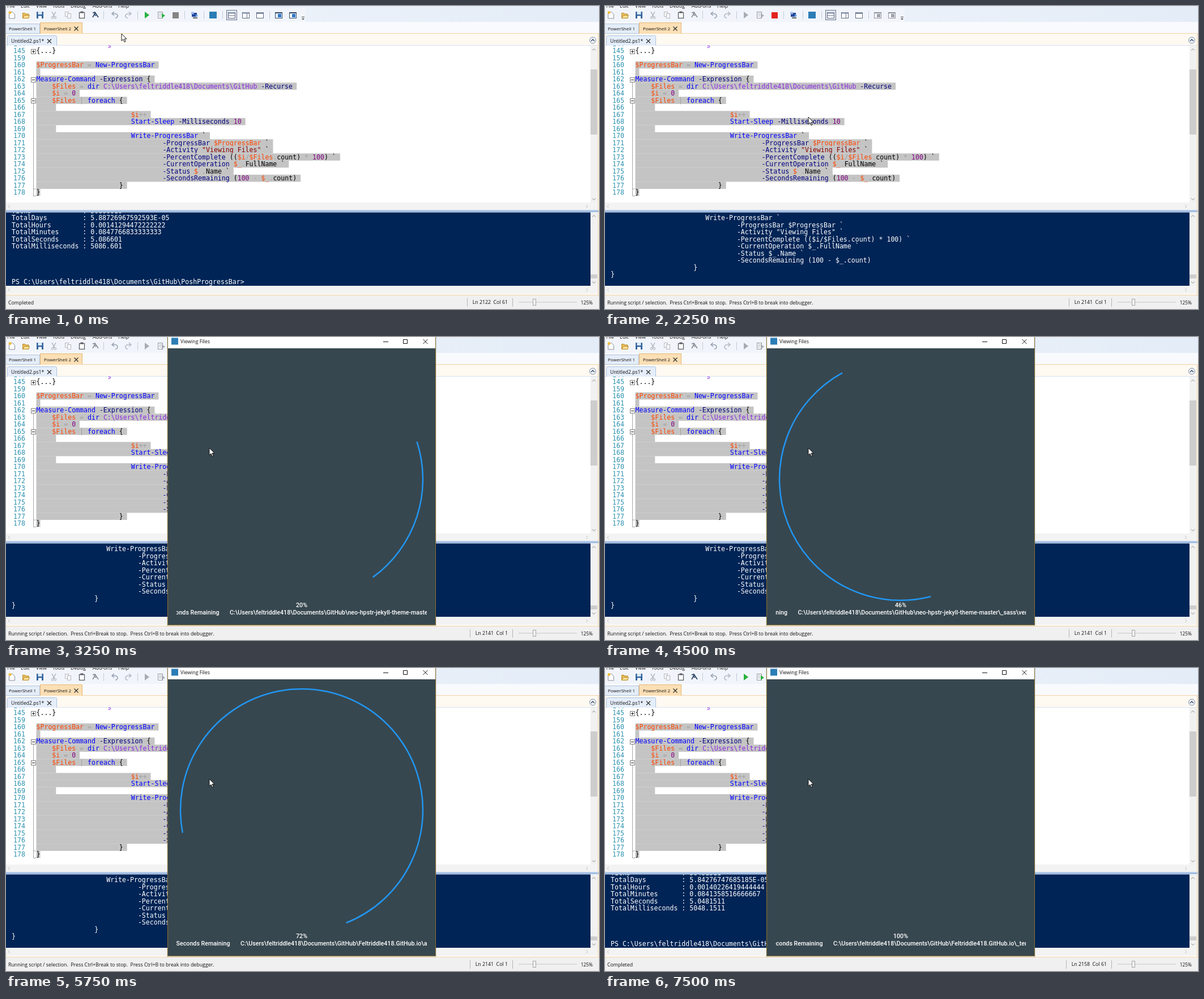
These frames come from a looping animation (1047x535 px, 8000 ms). An HTML page:

```html
<!DOCTYPE html>
<html lang="en">
<head>
<meta charset="utf-8">
<title>Script progress</title>
<style>
html, body { margin: 0; width: 100%; height: 100%; overflow: hidden; background: #fff; }
svg { display: block; width: 100%; height: 100%; }
text { white-space: pre; }
.mono { font: 11.57px "DejaVu Sans Mono", monospace; }
.ui { font: 8.8px "Open Sans", "Noto Sans", sans-serif; fill: #111; }
.tab { font-size: 8px; }
.file { font-size: 8.6px; }
.zoom { font-size: 8.4px; }
.bar { font: 500 10.7px Roboto, sans-serif; fill: #fff; }
.num { fill: #2b91af; }
.con { fill: #fff; }
.v { fill: #ff4500; } .o { fill: #a0a0a0; } .c { fill: #0000ff; } .p { fill: #000080; }
.a { fill: #8a2be2; } .s { fill: #8b0000; } .n { fill: #800080; } .b { fill: #000; }
</style>
</head>
<body>
<svg id="stage" viewBox="0 0 1047 535"></svg>
<script>
const STEP = 250, LOOP = 8000, RUN_AT = 6, WINDOW_AT = 10, DONE_AT = 29;
const CELL = 6.966, ROW = 12.5, USER = 'feltriddle418';
const HOME = `C:\\Users\\${USER}\\Documents\\GitHub`;

const esc = s => s.replace(/&/g, '&amp;').replace(/</g, '&lt;');
const rect = (x, y, w, h, fill, more = '') =>
  `<rect x="${x}" y="${y}" width="${w}" height="${h}" fill="${fill}" ${more}/>`;
const path = (d, stroke, width = 1, fill = 'none') =>
  `<path d="${d}" stroke="${stroke}" stroke-width="${width}" fill="${fill}"/>`;
const text = (x, y, s, cls, more = '') =>
  `<text x="${x}" y="${y}" class="${cls}" ${more}>${esc(s)}</text>`;
const group = (id, body, more = '') => `<g id="${id}" ${more}>${body}</g>`;
const END = 'text-anchor="end"', MID = 'text-anchor="middle"';

// Each line: indent, then tokens whose first letter is the colour class.
const code = [
  [0, 'v$ProgressBar~o = ~cNew-ProgressBar'],
  [0, ''],
  [0, 'cMeasure-Command~p -Expression~b {'],
  [4, `v$Files~o = ~cdir ~a${HOME}~p -Recurse`],
  [4, 'v$i~o = ~n0'],
  [4, 'v$Files~o | ~cforeach~b {'],
  [4, ''],
  [24, 'v$i~o++'],
  [24, 'cStart-Sleep~p -Milliseconds~n 10'],
  [4, ''],
  [24, 'cWrite-ProgressBar~b `'],
  [32, 'p-ProgressBar ~v$ProgressBar~b `'],
  [32, 'p-Activity ~s"Viewing Files"~b `'],
  [32, 'p-PercentComplete ~b((~v$i~o/~v$Files~o.~bcount)~o * ~n100~b) `'],
  [32, 'p-CurrentOperation ~v$_~o.~bFullName `'],
  [32, 'p-Status ~v$_~o.~bName `'],
  [32, 'p-SecondsRemaining ~b(~n100~o - ~v$_~o.~bcount)'],
  [21, 'b}'],
  [0, 'b}'],
].map(([indent, src]) => {
  const tokens = src ? src.split('~').map(t => [t[0], t.slice(1)]) : [];
  return { indent, tokens, plain: tokens.map(t => t[1]).join('') };
});

function editor() {
  const left = 53.5;
  let out = rect(0, 70, 1032, 277, '#fff');
  out += text(13, 70.5, '144', 'mono num') + text(left + 18 * CELL, 70.5, 'g', 'mono a');
  out += text(13, 83, '145', 'mono num') + text(left, 83, '{...}', 'mono b');
  out += text(13, 95.5, '159', 'mono num');
  code.forEach((line, i) => {
    const y = 108 + i * ROW, last = i === code.length - 1;
    const cells = line.indent + line.plain.length + (last ? 0 : 1);
    out += rect(left, y - 10.2, cells * CELL, ROW + .1, '#c4c4c4');
    out += text(13, y, String(160 + i), 'mono num');
    const spans = line.tokens.map(([cls, s]) => `<tspan class="${cls}">${esc(s)}</tspan>`).join('');
    out += `<text class="mono" x="${left + line.indent * CELL}" y="${y}">${spans}</text>`;
  });
  out += path('M48.5 134v29M48.5 171v164.500h4.500M48.5 323h4', '#a5a5a5');
  for (const [y, plus] of [[80, 1], [130, 0], [167, 0]])
    out += rect(44.5, y - 3.5, 8, 8, '#fff', 'stroke="#808080"') +
      path(`M46 ${y + .5}h5${plus ? 'M48.5 ' + (y - 2) + 'v5' : ''}`, '#222');
  return `<g clip-path="url(#editClip)">${out}</g>`;
}

const consoleLine = (row, s, indent = 0) =>
  text(10 + indent * CELL, 378 + row * ROW, s, 'mono con');

function results(ticks, days, hours, minutes, seconds, millis) {
  const rows = { Ticks: ticks, TotalDays: days, TotalHours: hours, TotalMinutes: minutes,
    TotalSeconds: seconds, TotalMilliseconds: millis };
  return Object.entries(rows).map(([k, v], i) => consoleLine(i - 1, k.padEnd(18) + ': ' + v)).join('') +
    consoleLine(9, `PS ${HOME}\\PoshProgressBar>`);
}

function status(message, place, edge) {
  return text(4, 527, message, 'ui') + text(886, 526, place, 'ui', END) +
    path(`M${edge} 516v15`, '#b5b5b5');
}

const frame = (x, split) => rect(x - 6.5, 11.5, 12, 10, '#fff', 'stroke="#5f6b80"') +
  rect(x - 6, 11, 11, 2.5, '#8593ab') + path(split, '#5f6b80');

function toolbar() {
  const grey = '#a9adb4';
  let out = path('M5.500 10.500h6l4 4v7.500h-10z', '#8a8f98', 1, '#fff') +
    '<circle cx="7" cy="11.500" r="2.500" fill="#f0bd3c"/>';
  out += path('M29.500 21.500v-9h4l1.500 1.500h5v7.500z', '#b98a2c', 1, '#e9bd5b') +
    path('M29.500 21.500l3-5h9l-2 5z', '#b98a2c', 1, '#fbdf96');
  out += rect(54, 10, 12, 12, '#35669f') + rect(56.5, 10, 7, 5, '#dce8f6') + rect(57, 17.5, 6, 4.5, '#fff');
  out += path('M81 10l5 9M88 10l-5 9', grey, 1.3) +
    '<g fill="none" stroke="#a9adb4"><circle cx="82" cy="20.500" r="1.800"/><circle cx="87" cy="20.500" r="1.800"/></g>';
  out += rect(104.5, 10.5, 6, 8, '#f5f6f8', 'stroke="#b6b9bf"') + rect(108.5, 13.5, 6, 8, '#f5f6f8', 'stroke="#b6b9bf"');
  out += rect(129.5, 11.5, 9, 10, '#fff', 'stroke="#5a5d63" stroke-width="1.300"') + rect(131.5, 9.5, 5, 3, '#5a5d63');
  out += path('M187 13.500h6q4 1 4 4t-4 4M191 10l-4 3.500 4 3.500', '#9aa3b3', 1.6);
  out += path('M221 13.500h-6q-4 1-4 4t4 4M217 10l4 3.500-4 3.500', '#b4bac5', 1.6);
  out += rect(328, 12, 9, 7, '#24479b') + rect(327, 10.5, 5, 4, '#9bb8e8') + path('M330 21h8', '#333', 1.5) +
    '<circle cx="336.500" cy="17" r="2" fill="#68a4e6"/>';
  out += rect(359, 10, 13, 12, '#2b7db6');
  out += rect(389.5, 7.5, 18, 17, '#e4e9f2', 'stroke="#6a7386"');
  out += frame(399, 'M393 17h11') + frame(424, 'M425.500 13v8') + frame(449, 'M443 13h11');
  out += [172, 232, 315, 349, 382, 465].map(x => path(`M${x}.5 9v14`, '#c3cad6')).join('');
  return out + path('M522 19.500h5', '#444') + path('M522 22h5l-2.500 2.500z', 'none', 0, '#444');
}

function runButtons(busy) {
  const pick = (on, off) => busy ? off : on;
  const go = pick('#25b03c', '#a7abb2'), ink = pick('#2d4568', '#8c9098'), accent = pick('#2c75c9', '#9ba1ab');
  let out = path('M153 12l4-1 6 9M157 11l-1 4-3 5M156 15l3 2', ink, 1.7);
  out += path('M245 10l8 6-8 6z', 'none', 0, go);
  out += rect(268.5, 10.5, 8, 11, '#fff', 'stroke="#9298a3"') + path('M270 13h5M270 15.500h4M270 18h4', '#a8afba') +
    path('M275 13l6 4-6 4z', 'none', 0, go);
  out += rect(294, 11, 11, 11, pick('#858585', '#e3231f'));
  for (const x of [482, 507])
    out += rect(x - 6.5, 11.5, 12, 10, '#fff', `stroke="${ink}"`) + rect(x - 6, 11, 11, 2, ink) +
      rect(x - 2, 14, 6, 6, accent);
  return out;
}

const arrow = (x, y, up) => path(`M${x - 3} ${y + (up ? 1.5 : -1.5)}l3 ${up ? -3 : 3} 3 ${up ? 3 : -3}`, '#888');
const side = (x, y, dir) => path(`M${x} ${y - 3}l${3 * dir} 3 ${-3 * dir} 3`, '#c2c2c2');

function chrome() {
  let out = rect(0, 0, 1047, 28, 'url(#top)') + rect(0, 4, 529, 24, '#f1f5fb');
  const menu = { File: 2, Edit: 26, View: 53, Tools: 82, Debug: 114, 'Add-ons': 153, Help: 198 };
  for (const name in menu) out += text(menu[name], 3.2, name, 'ui');
  out += rect(0, 28, 1047, 20, '#f8fafd') + rect(0, 48, 1047, 22, '#fef9f1') + path('M0 48.500h1047', '#f4d3a4');
  out += rect(-1, 31.5, 60.500, 17, '#e4edf8', 'stroke="#b6c6dc"') + text(5, 43, 'PowerShell 1', 'ui tab');
  out += path('M60.500 49V29.500H134.500V49', '#e5b777', 1, '#fbdfb5') + text(67, 43, 'PowerShell 2', 'ui tab');
  out += path('M120.500 36.500l7 7m0-7l-7 7', '#333', 1.3);
  out += path('M2.500 70V54.500q0-2 2-2H87.500q2 0 2 2V70', '#a9c3e4', 1, '#e5eefa') + text(9, 64.5, 'Untitled2.ps1*', 'ui file');
  out += path('M73 58.500l7 7m0-7l-7 7', '#333', 1.3) + path('M0 69.500h2M90 69.500h957', '#d7e3f2');
  out += '<circle cx="1036" cy="60.500" r="5.500" fill="#eef3fa" stroke="#7d8aa3"/>' + path('M1033 62l3-3 3 3', '#33415c', 1.3);
  out += toolbar() + editor();
  out += rect(1032, 70, 13, 277, '#f1f1f1') + arrow(1038, 77, true) + rect(1032, 112, 12, 115, '#cdcdcd') + arrow(1038, 341);
  out += rect(0, 347, 1045, 13, '#f3f3f3') + side(7, 354, -1) + side(1024, 354, 1);
  out += rect(0, 360, 1047, 4.5, '#b9cfec') + path('M0 362.500h1047', '#86a9d6');
  out += rect(0, 364.5, 1032, 129.5, '#012456') + rect(1032, 364.5, 13, 129.5, '#f1f1f1') +
    arrow(1038, 371, true) + rect(1032, 474, 12, 7, '#cdcdcd') + arrow(1038, 488);
  out += rect(0, 494, 1045, 14, '#f3f3f3') + side(7, 501, -1) + side(1024, 501, 1);
  out += rect(0, 508, 1047, 3, '#fefaf2') + path('M0 510.500H1047M1045.500 48V510', '#f1d5ad');
  out += rect(0, 511, 1047, 24, '#f0f0f0') + path('M894.500 516v15', '#b5b5b5');
  out += path('M905 523h103', '#d4d4d4', 1.5) + rect(930.5, 517.5, 5, 11, '#f3f3f3', 'stroke="#a5a5a5"');
  return out + text(1036, 526.5, '125%', 'ui zoom', END);
}

function progressWindow() {
  return rect(284, 0, 476, 510.5, '#000', 'opacity=".12"') + rect(285, -2, 474, 511, '#8b7331') +
    rect(286, -2, 472, 22, '#fff') + rect(286, 20, 472, 488, '#37474f') +
    rect(292, 1.5, 12, 12, '#2b7db6') + text(308, 11.3, 'Viewing Files', 'ui') +
    path('M666 8.500h9M701.500 4.500h7v7h-7zM736.500 4l8 8m0-8l-8 8', '#111') +
    '<path id="arc" fill="none" stroke="#2196f3" stroke-width="2.500"/>' +
    text(522, 476.5, '', 'bar', `id="percent" ${MID}`) +
    `<g clip-path="url(#lineClip)">${text(0, 490, '99 Seconds Remaining', 'bar', `id="remain" ${END}`)}` +
    `${text(0, 490, '', 'bar', 'id="file"')}</g>`;
}

const stage = document.getElementById('stage');
stage.innerHTML = `<defs>
  <linearGradient id="top"><stop stop-color="#f3f6fc"/><stop offset="1" stop-color="#e3ecf7"/></linearGradient>
  <clipPath id="editClip">${rect(0, 70, 1032, 277, '#000')}</clipPath>
  <clipPath id="conClip">${rect(0, 364.5, 1032, 129.5, '#000')}</clipPath>
  <clipPath id="lineClip">${rect(301, 478, 442, 20, '#000')}</clipPath></defs>` + chrome() +
  group('ready', runButtons(false)) + group('busy', runButtons(true) +
    code.slice(10).map((l, i) => consoleLine(i, l.plain, l.indent)).join('') +
    status('Running script / selection.  Press Ctrl+Break to stop.  Press Ctrl+B to break into debugger.',
      'Ln 2141  Col 1', 819.5)) +
  group('before', results('50866010', '5.88726967592593E-05', '0.00141294472222222',
    '0.0847766833333333', '5.086601', '5086.601'), 'clip-path="url(#conClip)"') +
  group('after', results('50481511', '5.84276747685185E-05', '0.00140226419444444',
    '0.0841358516666667', '5.0481511', '5048.1511'), 'clip-path="url(#conClip)"') +
  group('beforeStatus', status('Completed', 'Ln 2122  Col 61', 814.5)) +
  group('afterStatus', status('Completed', 'Ln 2158  Col 61', 814.5)) +
  group('dialog', progressWindow()) +
  group('cursor', path('M0 0v12.500l3-2.700 2.100 4.800 2-.9-2.100-4.600h4z', '#000', .9, '#fff'));

const el = {};
stage.querySelectorAll('[id]').forEach(e => el[e.id] = e);
const show = (id, on) => el[id].style.display = on ? '' : 'none';

const pointer = [[204, 49], [196, 63], [222, 45], [258, 20], [296, 5], [275, 13], [276, 13], [300, 70], [344, 166], [359, 196]];
const percents = [6, 10, 15, 20, 25, 31, 36, 41, 46, 51, 57, 62, 67, 72, 78, 83, 88, 93, 98, 100];

// Start x of the centred path and the folder being read, from a given percentage on.
const files = [
  [0, 395, 'neo-hpstr-jekyll-theme-master\\assets\\fonts'],
  [36, 340.5, 'neo-hpstr-jekyll-theme-master\\_sass\\vendor\\font'],
  [60, 414, 'Feltriddle418.GitHub.io\\assets\\css'],
  [78, 410, 'Feltriddle418.GitHub.io\\_posts\\notes'],
  [98, 403, 'Feltriddle418.GitHub.io\\_templates'],
];

function arcPath(p) {
  if (p >= 100) return '';
  const at = deg => {
    const a = deg * Math.PI / 180;
    return `${522 + 214 * Math.cos(a)} ${251 + 214 * Math.sin(a)}`;
  };
  return `M${at(3.6 * p - 90)}A214 214 0 ${+(p > 50)} 1 ${at(7.2 * p - 90)}`;
}

let shown = -1;
function draw(now) {
  const step = Math.floor(now % LOOP / STEP);
  if (step !== shown) {
    shown = step;
    const before = step < RUN_AT, after = step >= DONE_AT;
    show('ready', before || after);
    show('busy', !before && !after);
    show('before', before);
    show('beforeStatus', before);
    show('after', after);
    show('afterStatus', after);
    show('dialog', step >= WINDOW_AT);
    el.cursor.setAttribute('transform', `translate(${pointer[Math.min(step, pointer.length - 1)]})`);
    if (step >= WINDOW_AT) {
      const p = percents[Math.min(step - WINDOW_AT, percents.length - 1)];
      const [, x, name] = files.filter(f => p >= f[0]).pop();
      el.arc.setAttribute('d', arcPath(p));
      el.percent.textContent = p + '%';
      el.remain.setAttribute('x', x - 18.5);
      el.file.setAttribute('x', x);
      el.file.textContent = `${HOME}\\${name}`;
    }
  }
}

const start = performance.now();
function tick() {
  draw(performance.now() - start);
  requestAnimationFrame(tick);
}
tick();
</script>
</body>
</html>
```
